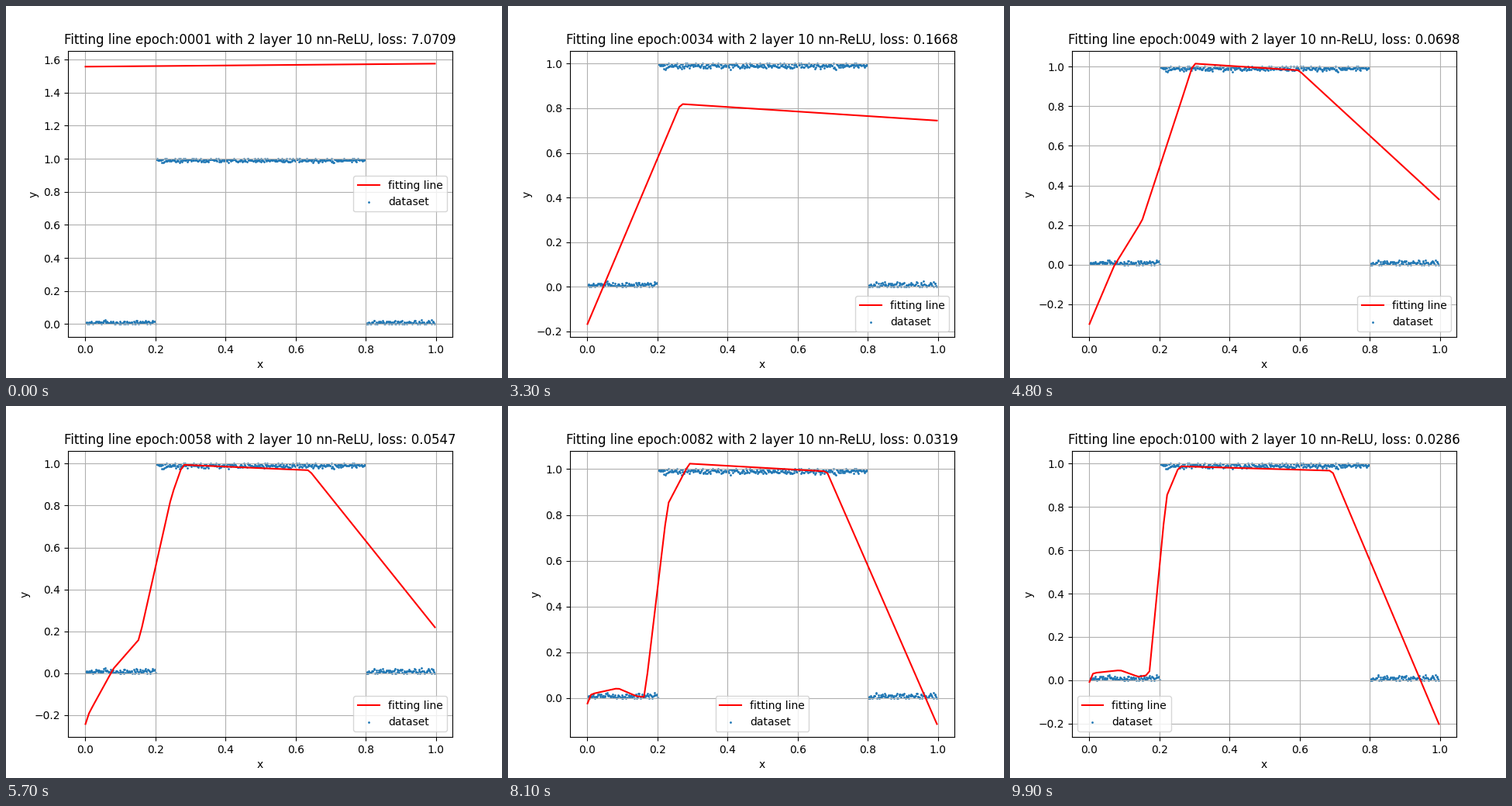
These frames come from a looping animation (640x480 px, 10000 ms). A matplotlib script:

```python
import numpy as np
import matplotlib.pyplot as plt
from matplotlib.animation import FuncAnimation

EPOCHS = 100
LEFT, RIGHT = 0.0002, 0.997
grid = np.linspace(LEFT, RIGHT, 100)

# Noisy box function, clipped to [0, 1]
rng = np.random.default_rng(4)
N = 500
xs = (np.arange(N) + rng.random(N)) / N * RIGHT
xs[0], xs[-1] = LEFT, RIGHT
noise = np.clip(rng.normal(0.009, 0.0065, N), 0, 0.025)
ys = np.where((xs > 0.2) & (xs < 0.8), 1 - noise, noise)


def lerp(a, b, t):
    return a + (b - a) * t


def one_bend(step):
    """Flat line that sinks to the data mean, then folds at a single bend."""
    p = np.clip((step - 19) / 14, 0, 1) ** 2.1
    y = [lerp(.653, -.1668, p), lerp(.660, .8195, p), lerp(.680, .745, p)]
    sink = np.exp(-0.35 * step) * (.904 - .009 * grid)
    return np.interp(grid, [LEFT, .2657, RIGHT], y) + sink


def many_bends(step):
    """Box-like fit: the foot sinks, the rise steepens, the top swings."""
    d = step - 48
    swing = np.cos(2 * np.pi * d / 33)
    grow = 1 - np.exp(-d / 12)

    start = -.008 - .292 * np.exp(-(d / 19.2) ** 2)
    hump_x, hump = .07 + .018 * grow, -.008 + .055 * grow
    foot_x = .15 + .0004 * d
    foot = np.interp(d, [0, 33, 51], [.222, .005, .025])
    shoulder = .845
    shoulder_x = foot_x + (shoulder - foot) / (5.4 + .225 * d)
    top_x = .281 - .0002 * d + .0155 * swing
    top = .9954 + .00024 * d + .0206 * swing
    edge_x = .597 + .1 * (1 - np.exp(-d / 17))
    edge = top - .027 - .007 * swing
    end = np.interp(d, [0, 17, 33, 51], [.33, .121, -.113, -.2025])

    kink = lerp(start, hump, .011 / hump_x) + .035 * grow
    dip = lerp(hump, foot, (.14 - hump_x) / (foot_x - hump_x))
    dip -= .0005 * max(d - 17, 0)
    return np.interp(
        grid,
        [LEFT, .011, hump_x, .14, foot_x, shoulder_x, top_x, edge_x, RIGHT],
        [start, kink, hump, dip, foot, shoulder, top, edge, end])


def fit(step):
    mix = np.clip((step - 33) / 15, 0, 1)
    return lerp(one_bend(min(step, 33)), many_bends(max(step, 48)), mix)


def loss(step):
    if step == 0:
        return 7.0709
    late = np.exp(np.interp(step, [19, 33, 48, 65, 81, 99],
                            np.log([.2313, .1668, .0698, .0441, .0319, .0286])))
    return late + 1.6 * np.exp(-0.7 * step)


fig, ax = plt.subplots(figsize=(6.4, 4.8), dpi=100)


def draw(step):
    ax.clear()
    ax.plot(grid, fit(step), color="red", label="fitting line")
    ax.scatter(xs, ys, s=1, label="dataset")
    ax.set_title(f"Fitting line epoch:{step + 1:04d} with 2 layer 10 nn-ReLU, "
                 f"loss: {loss(step):.4f}")
    ax.set_xlabel("x")
    ax.set_ylabel("y")
    ax.grid(True)
    ax.legend(loc="best")


anim = FuncAnimation(fig, draw, frames=EPOCHS, interval=100,
                     init_func=lambda: None, repeat=True)
plt.show()
```
